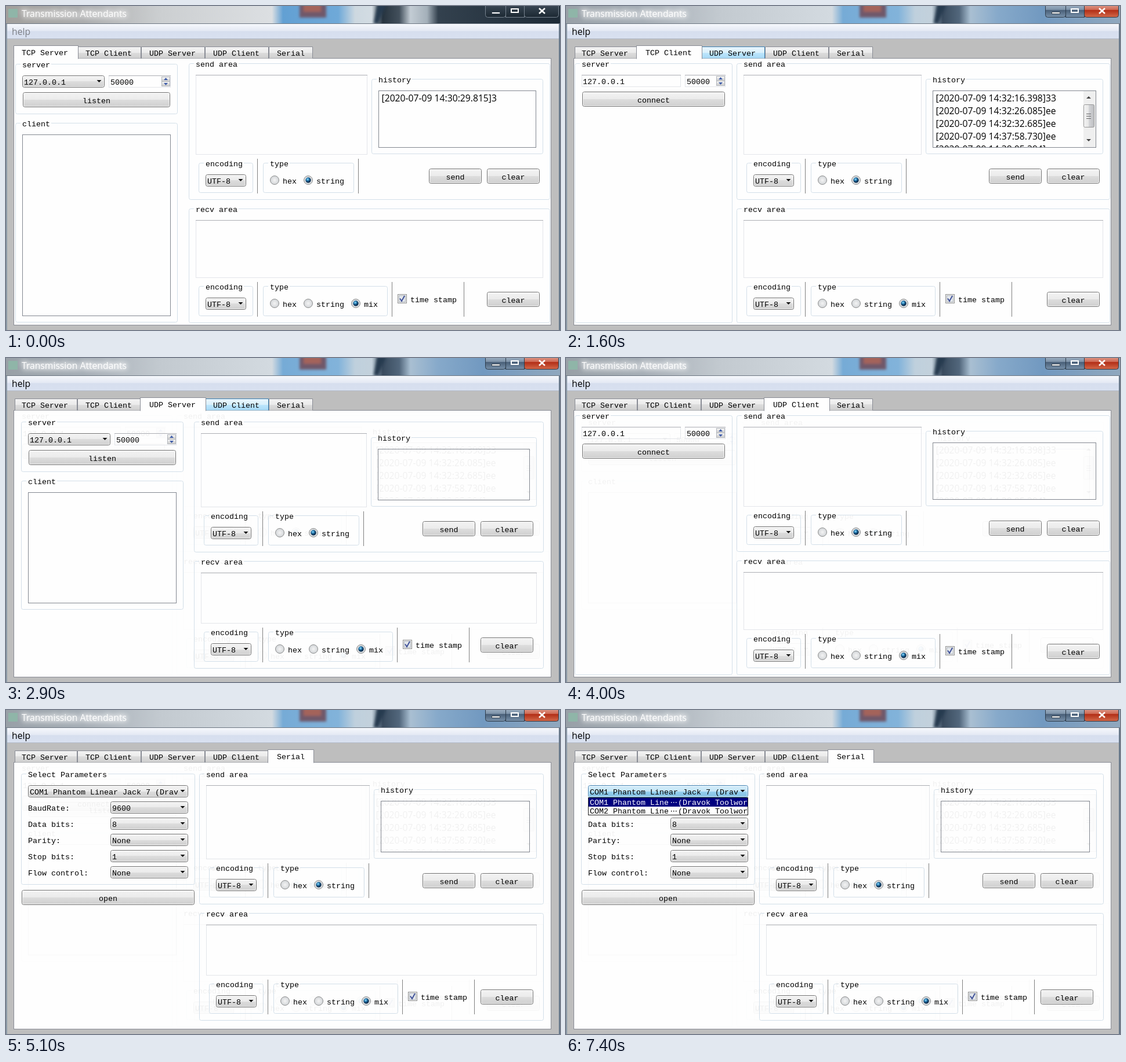
An HTML page for the animation above (8 s loop, 955 by 560 pixels).

```html
<!DOCTYPE html>
<html lang="en">
<head>
<meta charset="utf-8">
<title>Transmission Attendants</title>
<style>
html, body { margin: 0; width: 100%; height: 100%; overflow: hidden; background: #bebebe; }
svg { display: block; width: 955px; height: 560px; }
text { font: 13.333px "Liberation Mono", monospace; fill: #000; white-space: pre; }
.ui { font: 15.7px "Open Sans", "Noto Sans", sans-serif; }
</style>
</head>
<body>
<svg id="stage" viewBox="0 0 955 560" xmlns="http://www.w3.org/2000/svg">
<defs>
  <linearGradient id="btn" x2="0" y2="1">
    <stop offset="0" stop-color="#f3f3f3"/><stop offset=".5" stop-color="#ebebeb"/>
    <stop offset=".5" stop-color="#dddddd"/><stop offset="1" stop-color="#cfcfcf"/>
  </linearGradient>
  <linearGradient id="thumb">
    <stop offset="0" stop-color="#f3f3f3"/><stop offset=".5" stop-color="#e6e6e6"/>
    <stop offset=".5" stop-color="#d4d5d8"/><stop offset="1" stop-color="#bcbdc0"/>
  </linearGradient>
  <linearGradient id="hot" x2="0" y2="1">
    <stop offset="0" stop-color="#eaf6fd"/><stop offset=".5" stop-color="#d9f0fc"/>
    <stop offset=".5" stop-color="#bee6fd"/><stop offset="1" stop-color="#a7d9f5"/>
  </linearGradient>
  <linearGradient id="press" x2="0" y2="1">
    <stop offset="0" stop-color="#d5edfa"/><stop offset=".5" stop-color="#c4e5f6"/>
    <stop offset=".5" stop-color="#98d1ef"/><stop offset="1" stop-color="#7fbfe2"/>
  </linearGradient>
  <linearGradient id="menu" x2="0" y2="1">
    <stop offset="0" stop-color="#f6f8fc"/><stop offset=".45" stop-color="#e4e9f4"/>
    <stop offset=".5" stop-color="#d6deee"/><stop offset="1" stop-color="#d9e1f0"/>
  </linearGradient>
  <linearGradient id="glass">
    <stop offset="0" stop-color="#98a0a7"/><stop offset=".14" stop-color="#a5adb5"/>
    <stop offset=".28" stop-color="#c3cad0"/><stop offset=".48" stop-color="#d3dae0"/>
    <stop offset=".5" stop-color="#76abd6"/><stop offset=".6" stop-color="#82b3da"/>
    <stop offset=".63" stop-color="#bfd0dd"/><stop offset=".66" stop-color="#c3d1dc"/>
    <stop offset=".68" stop-color="#394b5e"/><stop offset=".71" stop-color="#52677c"/>
    <stop offset=".73" stop-color="#a9bfd2"/><stop offset=".78" stop-color="#86a9ca"/>
    <stop offset=".86" stop-color="#7299c0"/><stop offset="1" stop-color="#90a8be"/>
  </linearGradient>
  <linearGradient id="dimGlass">
    <stop offset="0" stop-color="#a19f9c"/><stop offset=".14" stop-color="#abacad"/>
    <stop offset=".28" stop-color="#cccfd1"/><stop offset=".48" stop-color="#dcdfe2"/>
    <stop offset=".5" stop-color="#62a0d3"/><stop offset=".6" stop-color="#6fa9d8"/>
    <stop offset=".63" stop-color="#cdd8e0"/><stop offset=".66" stop-color="#d3dce3"/>
    <stop offset=".68" stop-color="#27343f"/><stop offset=".71" stop-color="#43505c"/>
    <stop offset=".73" stop-color="#c3ccd4"/><stop offset=".76" stop-color="#a4b0ba"/>
    <stop offset=".78" stop-color="#33414e"/><stop offset="1" stop-color="#1d2a36"/>
  </linearGradient>
  <linearGradient id="cap" x2="0" y2="1">
    <stop offset="0" stop-color="#a9bbcd"/><stop offset=".45" stop-color="#7e93a9"/>
    <stop offset=".5" stop-color="#4a6079"/><stop offset="1" stop-color="#7891aa"/>
  </linearGradient>
  <linearGradient id="dimCap" x2="0" y2="1">
    <stop offset="0" stop-color="#3d4b58"/><stop offset="1" stop-color="#1c2833"/>
  </linearGradient>
  <linearGradient id="red" x2="0" y2="1">
    <stop offset="0" stop-color="#e3a99b"/><stop offset=".45" stop-color="#cf6a55"/>
    <stop offset=".5" stop-color="#b32f17"/><stop offset="1" stop-color="#d2694a"/>
  </linearGradient>
  <radialGradient id="dot" cx=".4" cy=".35">
    <stop offset="0" stop-color="#a8e6ff"/><stop offset=".45" stop-color="#2b86bd"/>
    <stop offset="1" stop-color="#0b2f52"/>
  </radialGradient>
  <radialGradient id="ring">
    <stop offset="0" stop-color="#f4f4f4"/><stop offset="1" stop-color="#d2d5d8"/>
  </radialGradient>
  <filter id="soft"><feGaussianBlur stdDeviation="2"/></filter>
  <filter id="glow" x="-10%" y="-40%" width="120%" height="180%"><feGaussianBlur stdDeviation="4"/></filter>
  <clipPath id="list"><rect x="633" y="147" width="258" height="97"/></clipPath>
</defs>
<g id="view"></g>
</svg>
<script>
const LOOP = 8000;
const view = document.getElementById('view');
const GRAY = '#707070', BLUE = '#3c7fb1', LINE = '#828790';

// Edges are given as left, top, right, bottom pixels.
const box = (l, t, r, b, fill = 'none', stroke = 'none', rx = 0) => {
  const o = stroke === 'none' ? 0 : 0.5;
  return `<rect x="${l + o}" y="${t + o}" width="${r - l - 2 * o}" height="${b - t - 2 * o}" rx="${rx}" fill="${fill}" stroke="${stroke}"/>`;
};
const path = (d, fill = 'none', stroke = 'none', w = 1) =>
  `<path d="${d}" fill="${fill}" stroke="${stroke}" stroke-width="${w}"/>`;
// y is the middle of the line of text.
const txt = (x, y, s, extra = '') => `<text x="${x}" y="${y + 4.5}" ${extra}>${s}</text>`;
const mid = (x, y, s) => txt(x, y, s, 'text-anchor="middle"');
const ui = (x, base, s, extra = '') => `<text class="ui" x="${x}" y="${base}" ${extra}>${s}</text>`;
const arrow = (x, y, h = 4, fill = '#111') => path(`M${x - 4} ${y - h / 2}h8l-4 ${h}z`, fill);

const group = (l, t, r, b, name, lx = l + 12) =>
  box(l, t, r, b, 'none', '#d3dfe9', 3) +
  box(lx - 3, t - 1, lx + name.length * 8 + 2, t + 2, '#fefefe') + txt(lx, t + 1, name);

const face = (l, t, r, b, fill) => {
  const hot = fill !== 'btn';
  return box(l, t, r, b, `url(#${fill})`, hot ? BLUE : GRAY, 3) +
    box(l + 1, t + 1, r - 1, b - 1, 'none', 'rgba(255,255,255,.75)', 2);
};
const button = (l, t, r, b, name, fill = 'btn') =>
  face(l, t, r, b, fill) + mid((l + r) / 2, (t + b) / 2 + 1.5, name);

const combo = (l, t, r, s, fill = 'btn') =>
  face(l, t, r, t + 21, fill) + txt(l + 3, t + 11, s) + arrow(r - 9.5, t + 10);

const edit = (l, t, r, b, hot) =>
  box(l, t, r, b, 'none', hot ? '#b5cfe7' : '#e3e5ea') +
  path(`M${l} ${t + 0.5}H${r}`, 'none', hot ? '#5794bf' : '#abadb3');

const spin = (l, t, r, hot) =>
  edit(l, t, r, t + 21, hot) + txt(l + 3, t + 11, '50000') +
  [0, 8].map(d => box(r - 16, t + 2 + d, r - 1, t + 11 + d, hot ? 'url(#hot)' : 'url(#btn)', hot ? BLUE : '#b0b4ba')).join('') +
  path(`M${r - 12} ${t + 8}h7l-3.5 -4z M${r - 12} ${t + 13}h7l-3.5 4z`, '#3d5ba8');

const radio = (x, y, name, on) =>
  `<circle cx="${x}" cy="${y}" r="7.5" fill="url(#ring)" stroke="#8e8f8f"/>` +
  (on ? `<circle cx="${x}" cy="${y}" r="4.7" fill="url(#dot)"/>` : '') + txt(x + 14, y + 1, name);

const check = (x, y) =>
  box(x, y, x + 16, y + 16, '#f6f6f6', '#8e8f8f') + box(x + 2, y + 2, x + 14, y + 14, '#e4e8ec', '#aeb3b9') +
  path(`M${x + 4} ${y + 7.5}l3 4.5 5 -9`, 'none', '#42539a', 2) + txt(x + 22, y + 9, 'time stamp');

const rule = (x, t) => path(`M${x + 0.5} ${t}v60`, 'none', '#808080');

// Row shared by the send and recv areas; y is the top of its small groups.
const options = (d, y, names) => {
  const wide = names.length > 2;
  return group(332 + d, y, 426 + d, y + 52, 'encoding') + combo(344 + d, y + 20, 414 + d, 'UTF-8') +
    rule(433 + d, y - 7) + group(443 + d, y, (wide ? 658 : 600) + d, y + 52, 'type') +
    names.map((n, i) => radio([463, 521, 603][i] + d, y + 30, n, i === names.length - 1)).join('') +
    rule((wide ? 665 : 607) + d, y - 7);
};

function areas(left, inset, histX, rows = '') {
  const d = left - 315, right = 938 - inset, low = inset ? 1 : 0, y = 484 - inset;
  return group(left, 99 + inset, right, 335 + low, 'send area') +
    edit(left + 12, 119 + inset, histX - 7, 257 + low) +
    group(histX, 126 + inset, right - 12, 256 + low, 'history') +
    box(histX + 12, 146 + inset, right - 24, 245 + low, 'none', LINE) + rows +
    options(d, 271 + low, ['hex', 'string']) +
    button(729 - inset, 281 + low, 820 - inset, 307 + low, 'send') +
    button(829 - inset, 281 + low, 920 - inset, 307 + low, 'clear') +
    group(left, 350 + low, right, 548 - inset, 'recv area') +
    edit(left + 12, 370 + low, right - 12, 470 - inset) +
    options(d, y, ['hex', 'string', 'mix']) + check(675 + d, y + 14) + rule(789 + d, y - 7) +
    button(829 - inset, y + 10, 920 - inset, y + 36, 'clear');
}

const server = (o, bottom, hotListen, hotSpin) =>
  `<g transform="translate(${o} ${o})">` +
  group(16, 100, 296, 187, 'server') + combo(28, 120, 170, '127.0.0.1') + spin(177, 120, 284, hotSpin) +
  button(29, 149, 283, 175, 'listen', hotListen ? 'hot' : 'btn') +
  group(16, 202, 296, bottom - o, 'client') + box(28, 222, 284, bottom - o - 11, 'none', LINE) + '</g>';

const client = () =>
  group(15, 99, 287, 548, 'server') + edit(27, 119, 198, 140) + txt(29, 130, '127.0.0.1') +
  spin(205, 119, 275) + button(28, 148, 274, 174, 'connect');

const log = () => {
  const lines = ['14:32:16.398]33', '14:32:26.085]ee', '14:32:32.685]ee', '14:37:58.730]ee', '14:38:05.294]e'];
  return '<g clip-path="url(#list)">' +
    lines.map((s, i) => ui(637.5, 165 + 22 * i, '[2020-07-09 ' + s)).join('') + '</g>' +
    box(892, 147, 913, 244, '#efefef') + box(892, 170, 911, 210, 'url(#thumb)', '#979797', 2) +
    path('M897 186.5h8m-8 4h8m-8 4h8', 'none', '#666') + arrow(901, 158, -4, '#444') + arrow(901, 232, 4, '#444');
};

function serial(port, drop) {
  const rows = [['BaudRate:', '9600'], ['Data bits:', '8'], ['Parity:', 'None'], ['Stop bits:', '1'], ['Flow control:', 'None']];
  let s = group(26, 110, 326, 302, 'Select Parameters') +
    combo(38, 130, 314, 'COM1 Phantom Linear Jack 7 (Drav', port) +
    rows.map(([k, v], i) => txt(38, 169 + 28 * i, k) + combo(180, 158 + 28 * i, 314, v)).join('') +
    button(27, 311, 325, 337, 'open');
  for (let i = 0; i < drop; i++) {
    const y = 152 + 15 * i, ink = i ? '' : 'style="fill:#fff"';
    s += box(39, y, 313, y + 15, i ? '#fff' : '#00007f') +
      txt(41, y + 7.5, `COM${i + 1} Phantom Line`, ink) + txt(193, y + 7.5, '(Dravok Toolwor', ink) +
      [181, 185, 189].map(x => box(x, y + 7, x + 1.5, y + 8.5, i ? '#000' : '#fff')).join('');
  }
  return drop ? s + box(38, 151, 314, 152 + 15 * drop, 'none', '#222') : s;
}

function frame(active) {
  const title = 'Transmission Attendants';
  const cap = active ? 'url(#cap)' : 'url(#dimCap)', rim = active ? '#2d3b4a' : '#77838f';
  return box(0, 0, 955, 560, '#bebebe') + box(0, 0, 955, 31, active ? 'url(#glass)' : 'url(#dimGlass)') +
    '<g filter="url(#soft)">' + box(506, -4, 552, 20, '#70586a') + box(513, -4, 543, 10, '#a4635a') +
    path('M640 -4h16l-14 34h-8z', '#263a50') + '</g>' +
    `<g opacity="${active ? 0.6 : 0.5}">` + ui(27, 19, title, 'filter="url(#glow)" style="fill:#fff;stroke:#fff;stroke-width:4"') + '</g>' +
    box(4, 5, 20, 20, '#8fb5a8') + ui(27, 19, title, 'style="fill:#fff"') +
    box(826, -5, 862, 20, cap, rim, 4) + box(861, -5, 894, 20, cap, rim) +
    box(893, -5, 953, 20, active ? 'url(#red)' : cap, rim, 4) +
    box(837, 10, 852, 14, '#fff', '#3b4652') + box(870, 4, 884, 12, 'none', '#fff') + box(871, 5, 883, 11, 'none', '#fff') +
    path('M919 4l10 9m0 -9l-10 9', 'none', '#fff', 2.6) +
    box(0, 30, 955, 31, '#6c7682') + box(1, 31, 954, 57, 'url(#menu)') + path('M1 56.5H954', 'none', '#b4bccb') +
    ui(10, 50, 'help', active ? '' : 'style="fill:#7c7f86"') +
    box(0, 31, 2, 560, '#8c9aa8') + box(953, 31, 955, 560, '#67788a') +
    box(13, 90, 940, 552, '#fefefe', '#898c95');
}

function tabs(page, hot) {
  const edge = [15, 123, 233, 343, 453, 529];
  const names = ['TCP Server', 'TCP Client', 'UDP Server', 'UDP Client', 'Serial'];
  const tab = i => {
    const on = i === page, g = on ? 2 : 0, fill = on ? '#fefefe' : `url(#${i === hot ? 'hot' : 'btn'})`;
    const l = edge[i] - g, r = edge[i + 1] + g, foot = on ? 91.5 : 90.5;
    return path(`M${l + 0.5} ${foot}V${70.5 - g}H${r - 0.5}V${foot}`, fill, i === hot ? BLUE : '#898c95') +
      txt(edge[i] + (i ? 14 : 12), on ? 80.5 : 81.5, names[i]);
  };
  return names.map((n, i) => i === page ? '' : tab(i)).join('') + tab(page);
}

const pages = [
  s => server(0, 547, s.listen, s.spin) + areas(315, 0, 630, ui(647.5, 165, '[2020-07-09 14:30:29.815]3')),
  () => client() + areas(294, 0, 620, log()),
  () => server(10, 435) + areas(324, 11, 629),
  () => client() + areas(294, 0, 620),
  s => serial(s.port, s.drop) + areas(333, 11, 634)
];

function stateAt(t) {
  const during = (a, b) => t >= a && t < b;
  const hover = [[800, 1200], [1600, 2700], [2900, 4000], [4700, 5100]];
  return {
    page: [1200, 2700, 4000, 5100].filter(x => t >= x).length,
    hot: hover.findIndex(([a, b]) => during(a, b)) + 1 || -1,
    listen: during(500, 600),
    spin: during(600, 800),
    port: t >= 7200 ? 'press' : t >= 7100 ? 'hot' : 'btn',
    drop: t >= 7400 ? 2 : t >= 7300 ? 1 : 0
  };
}

// Faint traces of earlier pages stay visible below the current one.
const traces = page => [1, 2].filter(i => i < page)
  .map(i => `<g opacity=".05">${pages[i]({})}</g>`).join('');

let last = '';
function render(t) {
  const s = stateAt(t), key = JSON.stringify(s);
  if (key === last) return;
  last = key;
  view.innerHTML = frame(s.page > 0) + traces(s.page) + pages[s.page](s) + tabs(s.page, s.hot);
}

const start = performance.now();
function tick() {
  render((performance.now() - start) % LOOP);
  requestAnimationFrame(tick);
}
tick();
</script>
</body>
</html>
```
